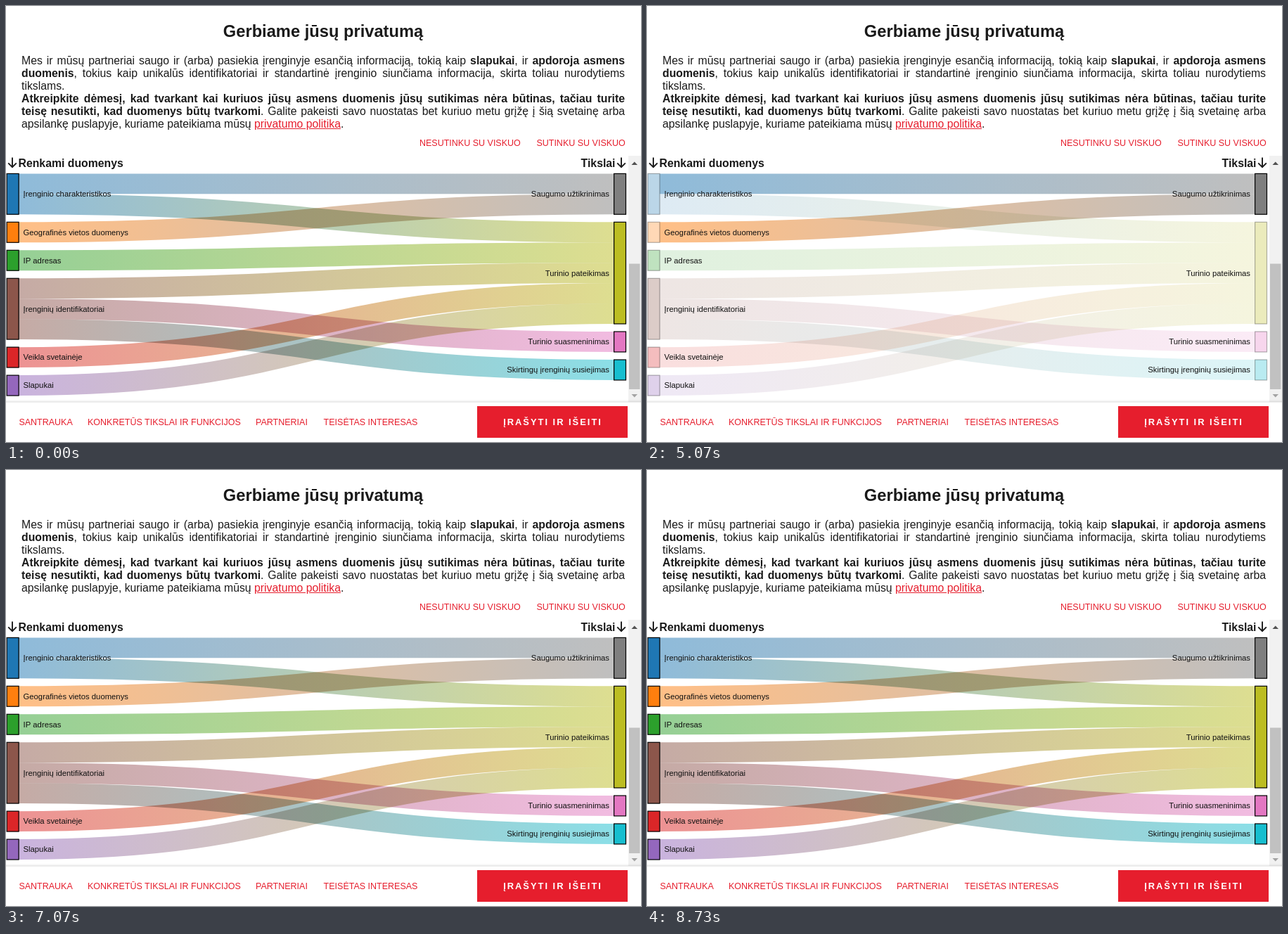
Animation of 903 by 620 pixels, one loop 9.74 s. Source, as an HTML page with a canvas:

```html
<!DOCTYPE html>
<html lang="lt">
<head>
<meta charset="utf-8">
<title>Gerbiame jūsų privatumą</title>
<style>
  html, body { margin: 0; width: 100%; height: 100%; overflow: hidden; background: #fff; }
  body { position: relative; font: 15.8px/17px "Liberation Sans", Arial, sans-serif; color: #1a1a1a; }
  canvas, h1, p, nav span, .btn, .head { position: absolute; margin: 0; white-space: nowrap; }
  canvas { left: 0; top: 0; }
  h1 { top: 23px; left: 0; width: 902px; text-align: center; font-size: 23.7px; line-height: 26px; }
  p { left: 22px; width: 858px; height: 17px; }
  .wide { text-align: justify; text-align-last: justify; }
  u, nav { color: #e61e2d; }
  nav { font-size: 12.5px; line-height: 14px; }
  .top span { top: 188px; }
  .bottom span { top: 585px; }
  .head { top: 215px; font-weight: bold; }
  .btn { left: 670px; top: 569px; width: 214px; height: 45px; background: #e61e2d; color: #fff;
    box-sizing: border-box; padding: 15px 0 0 1px; text-align: center;
    font: bold 12.9px/15px "Liberation Sans", Arial, sans-serif; letter-spacing: 2px; }
</style>
</head>
<body>
<canvas id="stage" width="903" height="620"></canvas>
<h1>Gerbiame jūsų privatumą</h1>
<p class="wide" style="top:69px">Mes ir mūsų partneriai saugo ir (arba) pasiekia įrenginyje esančią informaciją, tokią kaip <b>slapukai</b>, ir <b>apdoroja asmens</b></p>
<p class="wide" style="top:87px"><b>duomenis</b>, tokius kaip unikalūs identifikatoriai ir standartinė įrenginio siunčiama informacija, skirta toliau nurodytiems</p>
<p style="top:105px">tikslams.</p>
<p class="wide" style="top:123px"><b>Atkreipkite dėmesį, kad tvarkant kai kuriuos jūsų asmens duomenis jūsų sutikimas nėra būtinas, tačiau turite</b></p>
<p class="wide" style="top:141px"><b>teisę nesutikti, kad duomenys būtų tvarkomi</b>. Galite pakeisti savo nuostatas bet kuriuo metu grįžę į šią svetainę arba</p>
<p style="top:159px">apsilankę puslapyje, kuriame pateikiama mūsų <u>privatumo politika</u>.</p>
<nav class="top">
  <span style="left:588px">NESUTINKU SU VISKUO</span>
  <span style="left:754.4px">SUTINKU SU VISKUO</span>
</nav>
<div class="head" style="left:17.5px">Renkami duomenys</div>
<div class="head" style="right:calc(100% - 866.5px)">Tikslai</div>
<nav class="bottom">
  <span style="left:18.4px">SANTRAUKA</span>
  <span style="left:116px">KONKRETŪS TIKSLAI IR FUNKCIJOS</span>
  <span style="left:355px">PARTNERIAI</span>
  <span style="left:451.6px">TEISĖTAS INTERESAS</span>
</nav>
<div class="btn">ĮRAŠYTI IR IŠEITI</div>
<script>
const ctx = document.getElementById('stage').getContext('2d');
const LOOP = 9740, TOP = 238.4, BOTTOM = 554.05, GAP = 11.05;
const NODE_W = 16.9, LEFT_X = 1.2, RIGHT_X = 864.6, LINK_X = LEFT_X + NODE_W;

const C = {
  blue: [31, 119, 180], orange: [255, 127, 14], green: [44, 160, 44], red: [219, 38, 40],
  purple: [148, 103, 189], brown: [140, 86, 75], pink: [227, 119, 194], gray: [127, 127, 127],
  olive: [188, 189, 34], cyan: [23, 190, 207]
};
const rgb = c => `rgb(${C[c]})`;

const SOURCES = {
  device: ['Įrenginio charakteristikos', 'blue'], geo: ['Geografinės vietos duomenys', 'orange'],
  ip: ['IP adresas', 'green'], ident: ['Įrenginių identifikatoriai', 'brown'],
  activity: ['Veikla svetainėje', 'red'], cookies: ['Slapukai', 'purple'],
  interests: ['Interesai', 'orange'], demo: ['Demografinė infromacija', 'green'],
  ads: ['Sąveika su reklamomis', 'blue']
};
const TARGETS = {
  security: ['Saugumo užtikrinimas', 'gray'], content: ['Turinio pateikimas', 'olive'],
  personal: ['Turinio suasmeninimas', 'pink'], linking: ['Skirtingų įrenginių susiejimas', 'cyan'],
  adverts: ['Reklamu suasmeninimas', 'purple'], stats: ['Statistinis vertinimas', 'red']
};

// Link rows hold one weight per target, in target order.
const simple = layout('security content personal linking', {
  device: [1, 1], geo: [1], ip: [0, 1], ident: [0, 1, 1, 1], activity: [0, 1], cookies: [0, 1]
});
const full = layout('adverts personal stats security content linking', {
  geo: [4, 2, 1, 2], activity: [2, 2, 1, 0, 1], interests: [1, 2], ip: [2, 1, 0, 0, 2],
  demo: [2, 2], ads: [1, 0, 2], device: [2, 1, 0, 2, 3], cookies: [1, 1, 1, 1, 2],
  ident: [1, 2, 1, 1, 2, 1]
}, 'linking');

function layout(targetList, rows, pinned) {
  const sum = list => list.reduce((a, b) => a + b, 0);
  const ids = Object.keys(rows), targetIds = targetList.split(' ');
  const total = sum(ids.map(id => sum(rows[id])));
  const unit = (BOTTOM - TOP - GAP * (ids.length - 1)) / total;

  function stack(keys, info, weight, side) {
    let y = TOP;
    return keys.map(id => {
      const h = weight(id) * unit;
      if (id === pinned && side) y = BOTTOM - h;
      const node = { id, label: info[id][0], color: info[id][1], y, h, side, next: y };
      y += h + GAP;
      return node;
    });
  }
  const left = stack(ids, SOURCES, id => sum(rows[id]), 0);
  const right = stack(targetIds, TARGETS,
    id => sum(ids.map(s => rows[s][targetIds.indexOf(id)] || 0)), 1);

  const links = [];
  for (const from of left) rows[from.id].forEach((w, i) => {
    if (!w) return;
    const to = right[i], h = w * unit;
    links.push({ from, to, h, y0: from.next + h / 2, y1: to.next + h / 2 });
    from.next += h;
    to.next += h;
  });
  return { nodes: [...left, ...right], links };
}

function drawLink({ from, to, h, y0, y1 }, alpha) {
  const fill = ctx.createLinearGradient(LINK_X, 0, RIGHT_X, 0);
  fill.addColorStop(0, rgb(from.color));
  fill.addColorStop(1, rgb(to.color));
  const mid = (LINK_X + RIGHT_X) / 2;
  ctx.globalAlpha = alpha;
  ctx.strokeStyle = fill;
  ctx.lineWidth = h;
  ctx.beginPath();
  ctx.moveTo(LINK_X, y0);
  ctx.bezierCurveTo(mid, y0, mid, y1, RIGHT_X, y1);
  ctx.stroke();
}

function drawSankey({ nodes, links }, hover) {
  ctx.save();
  ctx.globalCompositeOperation = 'multiply';
  for (const link of links) drawLink(link, !hover || link.to.id === hover ? 0.5 : 0.15);
  ctx.restore();

  ctx.font = '11.3px "Liberation Sans", Arial, sans-serif';
  ctx.lineWidth = 1.2;
  ctx.strokeStyle = '#000';
  for (const n of nodes) {
    const box = [n.side ? RIGHT_X : LEFT_X, n.y, NODE_W, n.h];
    ctx.globalAlpha = !hover || n.id === hover ? 1 : 0.3;
    ctx.fillStyle = rgb(n.color);
    ctx.fillRect(...box);
    ctx.strokeRect(...box);
    ctx.globalAlpha = 1;
    ctx.fillStyle = '#111';
    ctx.textAlign = n.side ? 'right' : 'left';
    ctx.fillText(n.label, n.side ? 858 : 24.5, Math.round(n.y + n.h / 2 + 3.9));
  }
}

function path(points, close) {
  ctx.beginPath();
  points.forEach(([x, y]) => ctx.lineTo(x, y));
  if (close) ctx.fill(); else ctx.stroke();
}

function drawArrow(x) {
  ctx.strokeStyle = '#1a1a1a';
  ctx.lineWidth = 1.9;
  path([[x, 215.5], [x, 229]]);
  path([[x - 5.8, 223.3], [x, 229.2], [x + 5.8, 223.3]]);
}

function drawFrame() {
  ctx.fillStyle = '#f1f1f1';
  ctx.fillRect(885, 213, 18, 350);
  ctx.fillStyle = '#c1c1c1';
  ctx.fillRect(886, 366.5, 15.5, 178.5);
  ctx.fillStyle = '#505050';
  path([[889.5, 226], [893.7, 221.5], [898, 226]], true);
  ctx.fillStyle = '#a3a3a3';
  path([[889.5, 552], [893.7, 556.5], [898, 552]], true);
  drawArrow(9);
  drawArrow(875);

  ctx.save();
  ctx.shadowColor = 'rgba(0,0,0,.35)';
  ctx.shadowBlur = 4;
  ctx.fillStyle = '#fff';
  ctx.fillRect(-10, 563.5, 923, 70);
  ctx.restore();
}

const TIMELINE = [
  [0, simple], [1930, full], [3800, simple], [5070, simple, 'security'],
  [5930, simple], [6000, simple, 'content'], [7070, simple], [7130, simple, 'personal'],
  [7600, simple], [7730, simple, 'linking'], [8530, simple]
];

const start = performance.now();
let shown;
function tick() {
  const t = (performance.now() - start) % LOOP;
  const step = TIMELINE.filter(s => s[0] <= t).pop();
  if (step !== shown) {
    shown = step;
    ctx.fillStyle = '#fff';
    ctx.fillRect(0, 0, 903, 620);
    drawSankey(step[1], step[2]);
    drawFrame();
  }
  requestAnimationFrame(tick);
}
tick();
</script>
</body>
</html>
```
